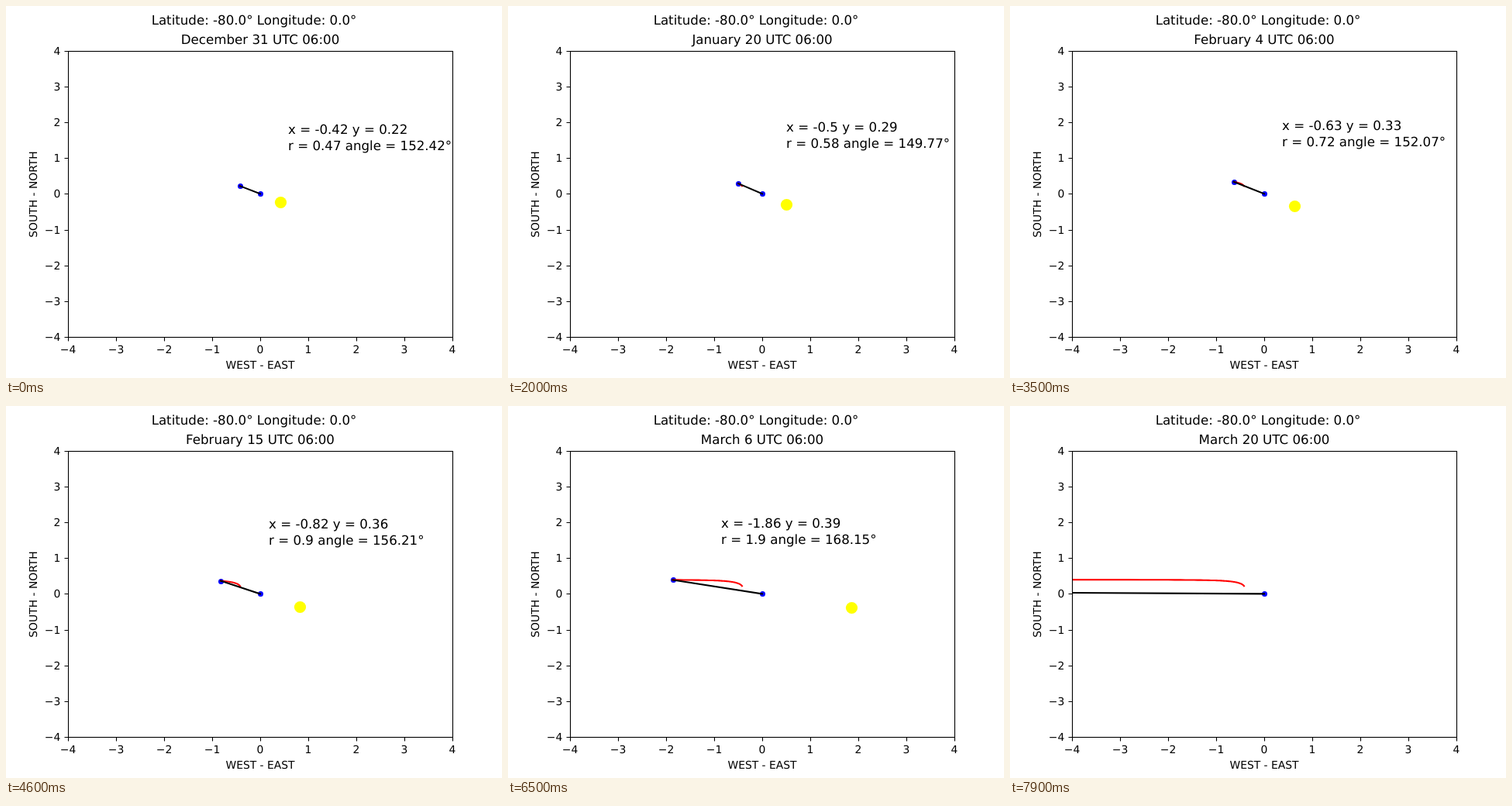
Animation of 640 by 480 pixels, one loop 8000 ms. Source, as an HTML page with a canvas:

```html
<!DOCTYPE html>
<html lang="en">
<head>
<meta charset="utf-8">
<title>Shadow path</title>
<style>
  html, body { margin: 0; width: 100%; height: 100%; overflow: hidden; background: #fff; }
  canvas { display: block; }
</style>
</head>
<body>
<canvas id="stage" width="640" height="480"></canvas>
<script>
const ctx = document.getElementById('stage').getContext('2d');
const DAYS = 80, STEP = 100, EQUINOX = 79.5;
const BOX = { left: 80, top: 57.6, width: 496, height: 369.6 };
const SMALL = 13.889, LARGE = 16.667;
const MONTHS = ['January', 'February', 'March'];
const MONTH_DAYS = [31, 28, 31];

// Known shadow tips: day, angle above west in degrees, distance to the west.
const KNOTS = [
  [0, 27.58, 0.42], [20, 30.23, 0.4972], [35, 27.93, 0.63173],
  [46, 23.79, 0.8205], [57, 17.57, 1.2045], [72, 6.28, 3.5968]
].map(([day, angle, west]) => {
  const left = EQUINOX - day;
  return { day, q: left * left, slope: Math.tan(angle * Math.PI / 180) / left, inv: 1 / west / left };
});

// Parabola through three neighbouring knots.
function parabola(mid, q, key) {
  const [a, b, c] = KNOTS.slice(mid - 1, mid + 2);
  const part = (m, n, o) => m[key] * (q - n.q) * (q - o.q) / ((m.q - n.q) * (m.q - o.q));
  return part(a, b, c) + part(b, a, c) + part(c, a, b);
}

function blend(day, key) {
  const left = EQUINOX - day, q = left * left;
  let j = 0;
  while (j < 4 && day >= KNOTS[j + 1].day) j++;
  const t = (q - KNOTS[j].q) / (KNOTS[j + 1].q - KNOTS[j].q);
  const from = parabola(Math.max(j, 1), q, key);
  const to = parabola(Math.min(j + 1, 4), q, key);
  return left * (from + (to - from) * t);
}

function shadowTip(day) {
  const x = -1 / blend(day, 'inv');
  return { x, y: -x * blend(day, 'slope') };
}

const tips = Array.from({ length: DAYS }, (_, day) => shadowTip(day));
const px = x => BOX.left + (x + 4) * BOX.width / 8;
const py = y => BOX.top + (4 - y) * BOX.height / 8;
const snap = v => Math.floor(v + 0.5) + 0.5;

function number(v) {
  const s = String(Math.round(v * 100) / 100);
  return s.includes('.') ? s : s + '.0';
}

function dateLabel(day) {
  if (day === 0) return 'December 31';
  let m = 0;
  while (day > MONTH_DAYS[m]) day -= MONTH_DAYS[m++];
  return `${MONTHS[m]} ${day}`;
}

function text(str, x, y, size, align = 'center') {
  ctx.font = `${size}px "DejaVu Sans", sans-serif`;
  ctx.textRendering = 'geometricPrecision';
  ctx.textAlign = align;
  ctx.fillStyle = '#000';
  ctx.fillText(str, x, y);
}

function dot(x, y, radius, color) {
  ctx.fillStyle = color;
  ctx.beginPath();
  ctx.arc(snap(px(x)), snap(py(y)), radius, 0, Math.PI * 2);
  ctx.fill();
}

function line(points, color) {
  ctx.strokeStyle = color;
  ctx.lineWidth = 2.083;
  ctx.lineCap = 'square';
  ctx.lineJoin = 'round';
  ctx.beginPath();
  points.forEach(p => ctx.lineTo(px(p.x), py(p.y)));
  ctx.stroke();
}

function drawAxes() {
  ctx.strokeStyle = '#000';
  ctx.lineWidth = 1.111;
  ctx.lineCap = 'butt';
  ctx.lineJoin = 'miter';
  const x0 = snap(px(-4)), y0 = snap(py(-4));
  ctx.strokeRect(x0, snap(py(4)), BOX.width, y0 - snap(py(4)));
  ctx.beginPath();
  for (let v = -4; v <= 4; v++) {
    const x = snap(px(v)), y = snap(py(v));
    const label = (v < 0 ? '\u2212' : '') + Math.abs(v);
    ctx.moveTo(x, y0);
    ctx.lineTo(x, y0 + 5);
    ctx.moveTo(x0, y);
    ctx.lineTo(x0 - 5, y);
    text(label, px(v), 448, SMALL);
    text(label, 70.3, Math.round(py(v) + 5), SMALL, 'right');
  }
  ctx.stroke();
  text('WEST - EAST', 328, 467.5, SMALL);
  ctx.save();
  ctx.translate(40, 243);
  ctx.rotate(-Math.PI / 2);
  text('SOUTH - NORTH', 0, 0, SMALL);
  ctx.restore();
}

function drawScene(day) {
  const tip = tips[day];
  ctx.fillStyle = '#fff';
  ctx.fillRect(0, 0, 640, 480);

  ctx.save();
  ctx.beginPath();
  ctx.rect(BOX.left, BOX.top, BOX.width, BOX.height);
  ctx.clip();
  dot(0, 0, 3.5, '#00f');
  dot(tip.x, tip.y, 3.5, '#00f');
  dot(-tip.x, -tip.y, 7.6, '#ff0');
  line(tips.slice(0, day + 1), '#f00');
  line([{ x: 0, y: 0 }, tip], '#000');
  ctx.restore();

  drawAxes();
  text('Latitude: -80.0° Longitude: 0.0°', 320, 24, LARGE);
  text(`${dateLabel(day)} UTC 06:00`, 328, 49, LARGE);

  const angle = Math.atan2(tip.y, tip.x) * 180 / Math.PI;
  const x = Math.round(px(tip.x + 1)), y = Math.round(py(tip.y + 1));
  text(`x = ${number(tip.x)} y = ${number(tip.y)}`, x, y - 21, LARGE, 'left');
  text(`r = ${number(Math.hypot(tip.x, tip.y))} angle = ${number(angle)}°`, x, y, LARGE, 'left');
}

let shown = -1;
function tick(now) {
  const day = Math.floor(Math.max(now, 0) / STEP) % DAYS;
  if (day !== shown) drawScene(shown = day);
  requestAnimationFrame(tick);
}
drawScene(0);
requestAnimationFrame(tick);
</script>
</body>
</html>
```
